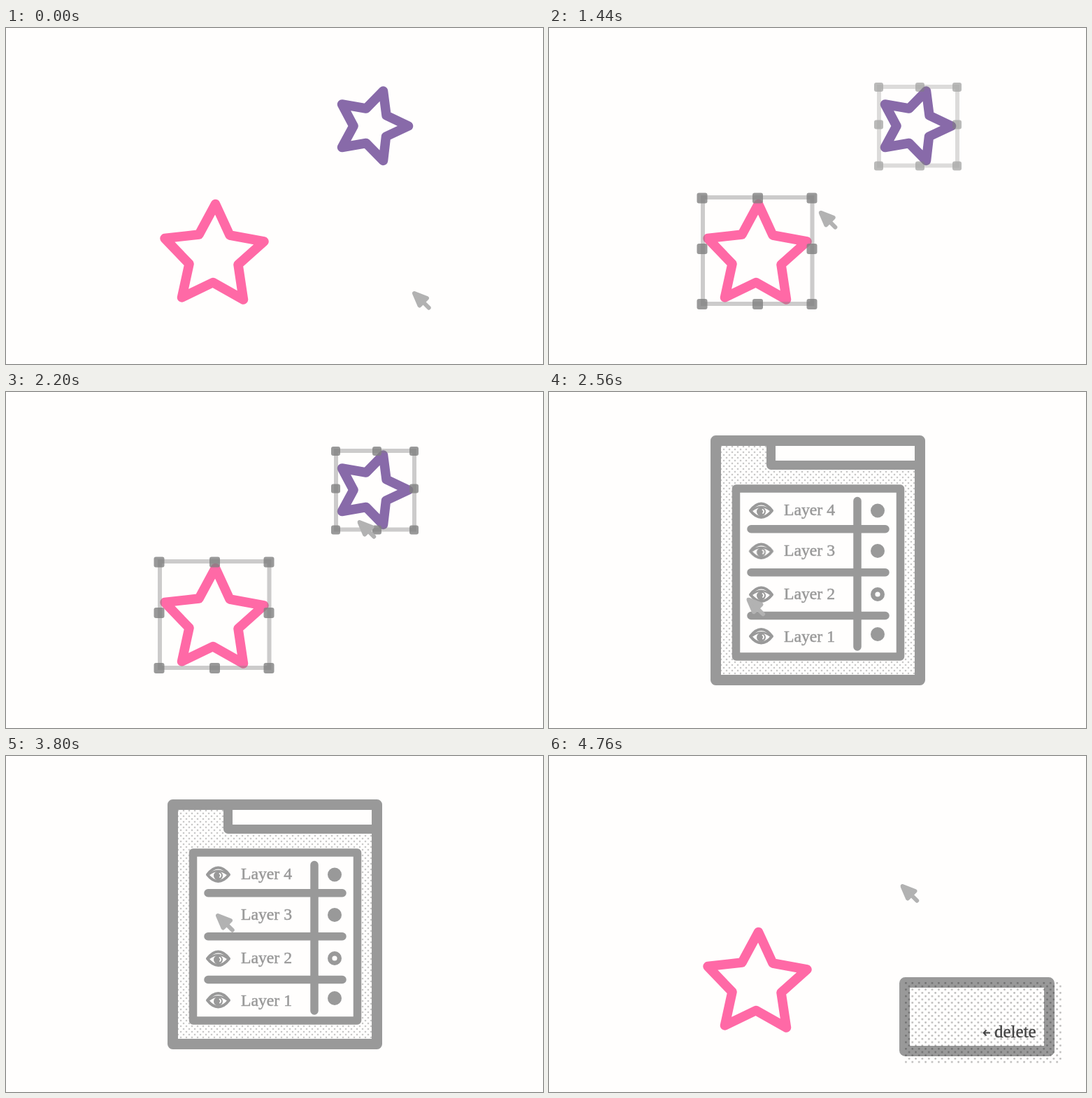
These frames come from a looping animation (768x480 px, 5040 ms). An HTML page:

```html
<!DOCTYPE html>
<html lang="en">
<head>
<meta charset="utf-8">
<title>Stars and layers</title>
<style>
html, body { margin: 0; width: 100%; height: 100%; overflow: hidden; background: #fffefd; }
svg { display: block; position: absolute; left: 0; top: 0; }
text { font-family: "Liberation Serif", serif; }

.stroke { fill: none; stroke-width: 13.5; stroke-linejoin: round; stroke-linecap: round; }
.frame { fill: none; stroke: rgba(128, 128, 128, .4); stroke-width: 6; }
.handles { fill: rgba(128, 128, 128, .8); }
.panel { fill: none; stroke: #999; stroke-linejoin: round; stroke-linecap: round; }
.label { fill: #999; stroke: #999; stroke-width: .5; font-size: 23.7px; }

.stars, .layers, .pinkBox, .purple, .eye3 { animation: 5040ms step-end infinite; }
.stars { animation-name: stars; }
.layers { animation-name: layers; }
.pinkBox { animation-name: pinkBox; }
.purple { animation-name: purple; }
.eye3 { animation-name: eye3; }
.purpleBox { animation: purpleBox 5040ms linear infinite; }
.key { animation: key 5040ms linear infinite; }

@keyframes stars {
  0% { visibility: visible; } 44.44% { visibility: hidden; } 79.36% { visibility: visible; }
}
@keyframes layers {
  0% { visibility: hidden; } 44.44% { visibility: visible; } 79.36% { visibility: hidden; }
}
@keyframes pinkBox { 0% { opacity: 0; } 23.01% { opacity: 1; } 44.44% { opacity: 0; } }
@keyframes purple { 0% { opacity: 1; } 94.44% { opacity: 0; } }
@keyframes eye3 { 0% { opacity: 1; } 75.39% { opacity: 0; } }
@keyframes purpleBox { 0% { opacity: 0; } 42% { opacity: 1; } 100% { opacity: 1; } }
@keyframes key { 0%, 79.36% { opacity: 0; } 83.33%, 100% { opacity: 1; } }

/* One path per leg of the walk; the distance runs 0 to 100% on each. */
.cursor {
  position: absolute; left: 0; top: 0; width: 28px; height: 28px;
  offset-anchor: 0 0; offset-rotate: 0deg;
  animation: leg 5040ms step-end infinite, travel 5040ms linear infinite;
}
@keyframes leg {
  0% { offset-path: path("M581 376C581 430 469 230 336 337"); }
  23% { offset-path: path("M336 337Q382 232 502.5 183"); }
  44.44% { offset-path: path("M87 236Q220 303 310 292"); }
  55.55% { offset-path: path("M310 292C285 298 243 298 243 285C243 270 280 292 310 292"); }
  66.66% { offset-path: path("M310 292C325 275 332 250 300 225"); }
  79.36%, 100% { offset-path: path("M336 337Q382 232 502.5 183"); }
}
@keyframes travel {
  0%, .4% { offset-distance: 0%; animation-timing-function: cubic-bezier(.5, 0, .8, .7); }
  11.905% { offset-distance: 43%; animation-timing-function: cubic-bezier(.2, .4, .5, 1); }
  21.8%, 22.99% { offset-distance: 100%; }
  23% { offset-distance: 0%; animation-timing-function: cubic-bezier(.5, 0, .8, .7); }
  28.571% { offset-distance: 39%; animation-timing-function: cubic-bezier(.2, .4, .5, 1); }
  39.68%, 44.43% { offset-distance: 100%; }
  44.44% { offset-distance: 0%; animation-timing-function: cubic-bezier(.4, .1, .7, .9); }
  50.794% { offset-distance: 88%; animation-timing-function: ease-out; }
  55.54% { offset-distance: 100%; }
  55.55% { offset-distance: 0%; animation-timing-function: ease-in-out; }
  66.65% { offset-distance: 100%; }
  66.66% { offset-distance: 0%; animation-timing-function: ease-in-out; }
  72.22%, 100% { offset-distance: 100%; }
}
</style>
</head>
<body>
<svg width="768" height="480" viewBox="0 0 768 480">
  <defs>
    <pattern id="fine" width="8" height="8" patternUnits="userSpaceOnUse">
      <g fill="#c8c8c8"><circle cx="2" cy="2" r="1.3"/><circle cx="6" cy="6" r="1.3"/></g>
    </pattern>
    <pattern id="coarse" width="9.4" height="9.4" patternUnits="userSpaceOnUse" x="508" y="322">
      <g fill-opacity=".27"><circle cx="2.4" cy="2.4" r="1.4"/><circle cx="7.1" cy="7.1" r="1.4"/></g>
    </pattern>
    <rect id="big" x="-7.5" y="-7.5" width="15" height="15" rx="3"/>
    <rect id="small" x="-6.5" y="-6.5" width="13" height="13" rx="3"/>
    <g id="eye">
      <path d="M-15.5 .5Q-8 -9.5 0 -9.5T15.5 .5Q8 10 0 10T-15.5 .5Z" fill="none" stroke="#999" stroke-width="4" stroke-linejoin="round"/>
      <path d="M-13 0Q0 -10 13 0" fill="none" stroke="#999" stroke-width="2.6"/>
      <circle cy="2" r="6.5" fill="#999"/>
      <path d="M2 -1Q5 1 2.5 4" fill="none" stroke="#fffefd" stroke-width="1.8" stroke-linecap="round"/>
    </g>
  </defs>

  <g class="stars">
    <path class="stroke" stroke="#ff69a6" d="M299.500 251.500L320 296L369 305L332 338L339.500 388L296 363.500L251.500 385L262 337L227 300.500L276 295Z"/>
    <g class="pinkBox">
      <path class="frame" d="M220 242H376.500V394H220Z"/>
      <g class="handles">
        <use href="#big" x="219" y="243"/><use href="#big" x="298.5" y="243"/><use href="#big" x="376" y="243"/>
        <use href="#big" x="219" y="315.5"/><use href="#big" x="376" y="315.5"/>
        <use href="#big" x="219" y="394.5"/><use href="#big" x="298.5" y="394.5"/><use href="#big" x="376" y="394.5"/>
      </g>
    </g>
    <g class="purple">
      <path class="stroke" stroke="#886aa9" d="M575.500 140L543.500 155L539.500 189.500L515 164.500L480.500 170.500L497 140L480.500 109L515 115L539.500 90L544 125Z"/>
      <g class="purpleBox">
        <path class="frame" d="M472 84H584V196.500H472Z"/>
        <g class="handles">
          <use href="#small" x="471.5" y="84.500"/><use href="#small" x="530.5" y="84.500"/><use href="#small" x="583.5" y="84.500"/>
          <use href="#small" x="471.5" y="138"/><use href="#small" x="583.5" y="138"/>
          <use href="#small" x="471.5" y="197"/><use href="#small" x="530.5" y="197"/><use href="#small" x="583.5" y="197"/>
        </g>
      </g>
    </g>
    <g class="key">
      <rect x="508.500" y="323.500" width="207" height="98" rx="1" fill="#fffefd" stroke="#999" stroke-width="15" stroke-linejoin="round"/>
      <rect x="508.500" y="322.500" width="225" height="117" fill="url(#coarse)"/>
      <path d="M631 395.500H621.500M625.500 391.500L621.500 395.500L625.500 399.500" fill="none" stroke="#444" stroke-width="1.900"/>
      <text x="637" y="402" font-size="25" fill="#444" stroke="#444" stroke-width=".4">delete</text>
    </g>
  </g>

  <g class="layers">
    <rect x="238.500" y="69.500" width="292" height="342" fill="url(#fine)"/>
    <rect x="317.500" y="70" width="212" height="34.500" fill="#fffefd"/>
    <path class="panel" stroke-width="13" d="M317.500 72V104.500H530"/>
    <rect class="panel" stroke-width="15" x="238.500" y="69.500" width="292" height="342"/>
    <rect x="267.500" y="138" width="235" height="240" fill="#fffefd" stroke="#999" stroke-width="11.500" stroke-linejoin="round"/>
    <path class="panel" stroke-width="11.500" d="M289 195.700H481M289 257.700H481M289 319.500H481M441 155.500V364"/>
    <use href="#eye" x="303.5" y="169"/>
    <use class="eye3" href="#eye" x="303.5" y="227"/>
    <use href="#eye" x="303.5" y="289"/>
    <use href="#eye" x="303.5" y="348.500"/>
    <g class="label">
      <text x="336" y="176">Layer 4</text>
      <text x="336" y="234">Layer 3</text>
      <text x="336" y="296">Layer 2</text>
      <text x="336" y="356.500">Layer 1</text>
    </g>
    <g fill="#999">
      <circle cx="470" cy="169.500" r="10"/><circle cx="470" cy="227" r="10"/><circle cx="470" cy="346" r="10"/>
    </g>
    <circle class="panel" cx="470" cy="289" r="6.800" stroke-width="6.400"/>
  </g>
</svg>
<div class="cursor">
  <svg width="28" height="28" fill="#b2b2b2" stroke="#b2b2b2" stroke-width="6" stroke-linejoin="round" stroke-linecap="round">
    <path d="M3 3L21 10L10.500 20.500ZM13 13L23.700 23.700"/>
  </svg>
</div>
</body>
</html>
```
